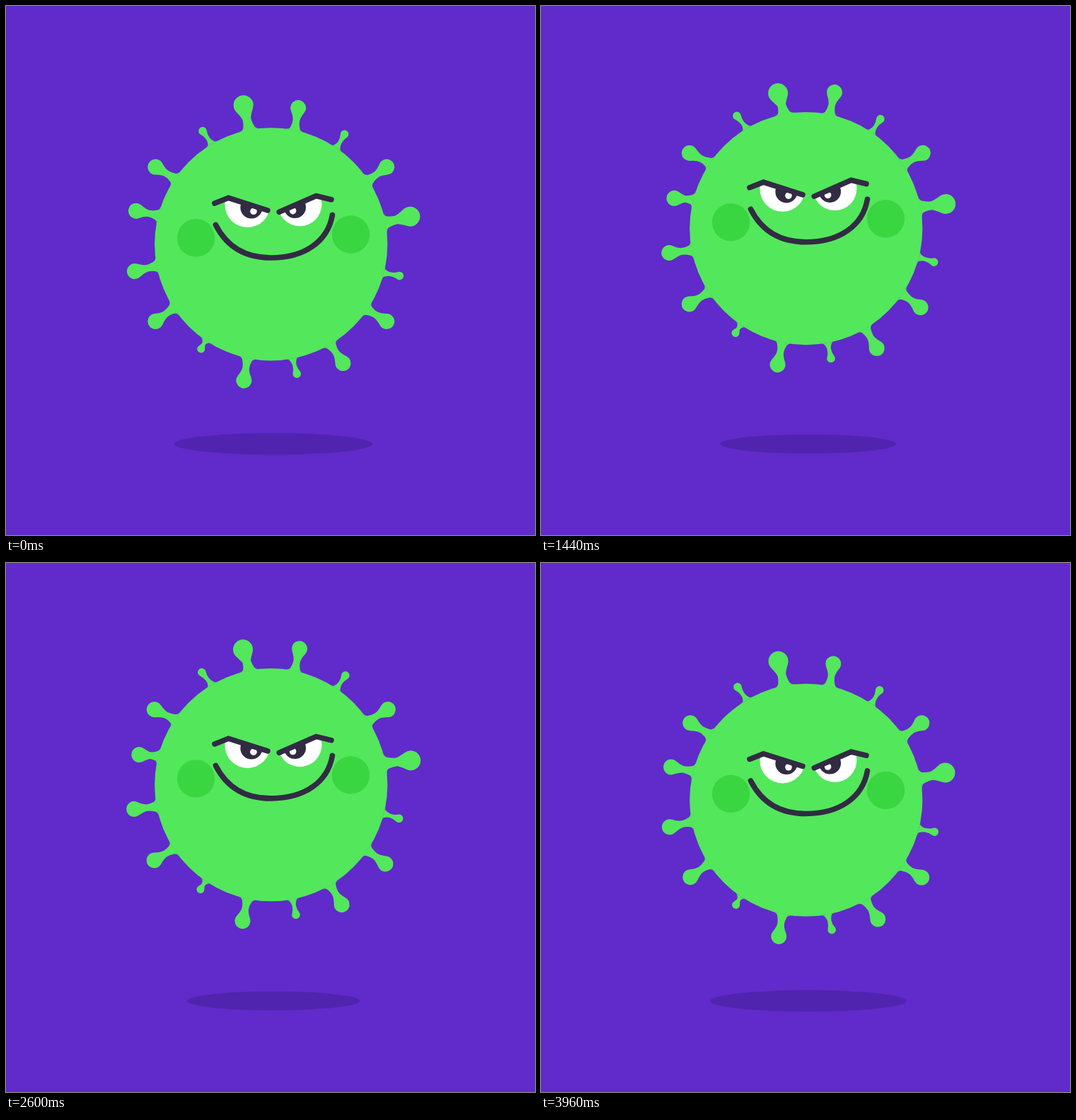
Animation of 748x748 px, one loop 4000 ms. Source, as an HTML page with a canvas:

```html
<!DOCTYPE html>
<html lang="en">
<head>
<meta charset="utf-8">
<title>Floating virus</title>
<style>
  html, body { margin: 0; width: 100%; height: 100%; overflow: hidden; background: #612aca; }
  canvas { display: block; width: 100%; height: 100%; }
</style>
</head>
<body>
<canvas id="stage" width="748" height="748"></canvas>
<script>
const ctx = document.getElementById('stage').getContext('2d');
const LOOP = 4000, STEP = 40, RAD = Math.PI / 180;
const BG = '#612aca', SHADOW = '#5024af', GREEN = '#53e75c', CHEEK = '#3ad641', DARK = '#322b43';
const BODY = { x: 374.8, y: 336.8, r: 164.6 };

// One letter per spike, clockwise from the right; capitals shrink and regrow
const SPIKES = 'bsmmsmtmmMmsBmsm';
const SIZES = {
  b: { reach: 200.5, head: 14 },
  m: { reach: 196.6, head: 11 },
  s: { reach: 187, head: 5.8 },
  t: { reach: 178.3, head: 5.5 }
};

// Straight runs between 0 and 1, turning at the given times
function zigzag(t, turns) {
  let i = 1;
  while (i < turns.length - 1 && t > turns[i]) i++;
  const part = (t - turns[i - 1]) / (turns[i] - turns[i - 1]);
  return i % 2 ? part : 1 - part;
}

function polar(angle, r) {
  return [BODY.x + r * Math.cos(angle), BODY.y + r * Math.sin(angle)];
}

function disc(x, y, r, color) {
  ctx.fillStyle = color;
  ctx.beginPath();
  ctx.arc(x, y, r, 0, Math.PI * 2);
  ctx.fill();
}

// Drop-shaped stalk from the body rim at angle a; axis is its own direction
function stalk(a, axis, len, r) {
  const [bx, by] = polar(a, BODY.r);
  const ux = Math.cos(axis), uy = Math.sin(axis);
  const at = (along, out) => [bx + ux * along - uy * out, by + uy * along + ux * out];
  const k = 0.4 * r + 0.4;
  const open = 120 * RAD, back = -r * Math.cos(open), side = r * Math.sin(open);
  const bend = Math.max(len * 0.45, len - back - (side - k) * Math.tan(60 * RAD));

  const edge = s => {
    const corner = polar(a + s * (k + 2.5) / BODY.r, BODY.r);
    const neck = at(len * 0.42, s * k);
    const root = corner.map((v, i) => v + (neck[i] - v) * 0.35);
    return [
      polar(a + s * (2 * k + 3.5) / BODY.r, BODY.r), corner, root,
      at(len * 0.28, s * k), neck,
      at(bend, s * k), at(len - back, s * side)
    ];
  };
  const follow = p => {
    for (let i = 1; i < p.length; i += 2) ctx.quadraticCurveTo(...p[i], ...p[i + 1]);
  };

  const left = edge(-1), right = edge(1).reverse();
  ctx.beginPath();
  ctx.moveTo(...left[0]);
  follow(left);
  ctx.arc(...at(len, 0), r, axis - open, axis + open);
  follow(right);
  ctx.fill();
}

function spikes(bounce, drift) {
  ctx.fillStyle = GREEN;
  [...SPIKES].forEach((kind, i) => {
    const { reach, head } = SIZES[kind.toLowerCase()];
    const nudge = i % 2 && i % 8 < 4 ? 2.6 : 0;
    const angle = (22.5 * i - 11.25 + nudge) * RAD;
    const foot = angle + 0.5 * RAD;

    const [bx, by] = polar(foot, BODY.r), [hx, hy] = polar(angle, reach);
    const shrink = kind < 'a' ? 7 * drift : 0;
    const cos = Math.cos(angle), turn = cos < 0 && Math.sin(angle) < 0 ? -1 : 1;
    const swing = turn * (0.1 + 0.13 * cos ** 4) * bounce;
    stalk(foot, Math.atan2(hy - by, hx - bx) + swing, Math.hypot(hx - bx, hy - by) - shrink, head);
  });
}

function line(points) {
  ctx.beginPath();
  points.forEach(p => ctx.lineTo(...p));
  ctx.stroke();
}

// Eye cut off along the brow
function eye(brow, [x, y, r], iris, glint) {
  ctx.save();
  ctx.beginPath();
  brow.forEach(p => ctx.lineTo(...p));
  ctx.lineTo(brow[2][0] + 5, 330);
  ctx.lineTo(brow[0][0] - 5, 330);
  ctx.clip();
  disc(x, y, r, '#fff');
  disc(...iris, 15.6, DARK);
  disc(...glint, 4.8, '#fff');
  ctx.restore();
  line(brow);
}

function face() {
  disc(268.6, 328, 26.7, CHEEK);
  disc(487.5, 323, 26.7, CHEEK);

  ctx.strokeStyle = DARK;
  ctx.lineWidth = 7.6;
  ctx.lineCap = 'round';
  eye([[295, 279], [314.5, 271.3], [370, 289]], [341.5, 281, 32], [347, 285], [350, 290.3]);
  eye([[386.3, 291.3], [438.5, 268.5], [460, 273.7]], [415.5, 280.3, 31], [408.5, 284.5], [405.6, 289.6]);

  ctx.beginPath();
  ctx.moveTo(296.5, 309.5);
  ctx.bezierCurveTo(312, 340, 338, 356, 374.5, 356);
  ctx.bezierCurveTo(422, 356, 455, 333, 461.5, 295.5);
  ctx.stroke();
}

function draw(t) {
  const bounce = zigzag(t, [0, 1000, 2020, 3000, LOOP]);
  const size = 1 - 0.2 * zigzag(t, [0, 980, 2040, 2920, LOOP]);
  const drift = zigzag(t, [0, LOOP / 2, LOOP]);

  ctx.fillStyle = BG;
  ctx.fillRect(0, 0, 748, 748);

  ctx.fillStyle = SHADOW;
  ctx.beginPath();
  ctx.ellipse(378, 619.2, 140 * size, 15.3 * size, 0, 0, Math.PI * 2);
  ctx.fill();

  ctx.save();
  ctx.translate(0, -39 * bounce);
  disc(BODY.x, BODY.y, BODY.r, GREEN);
  spikes(bounce, drift);
  face();
  ctx.restore();
}

const start = performance.now();
function tick() {
  const t = (performance.now() - start) % LOOP;
  draw(Math.floor(t / STEP) * STEP);
  requestAnimationFrame(tick);
}
tick();
</script>
</body>
</html>
```
